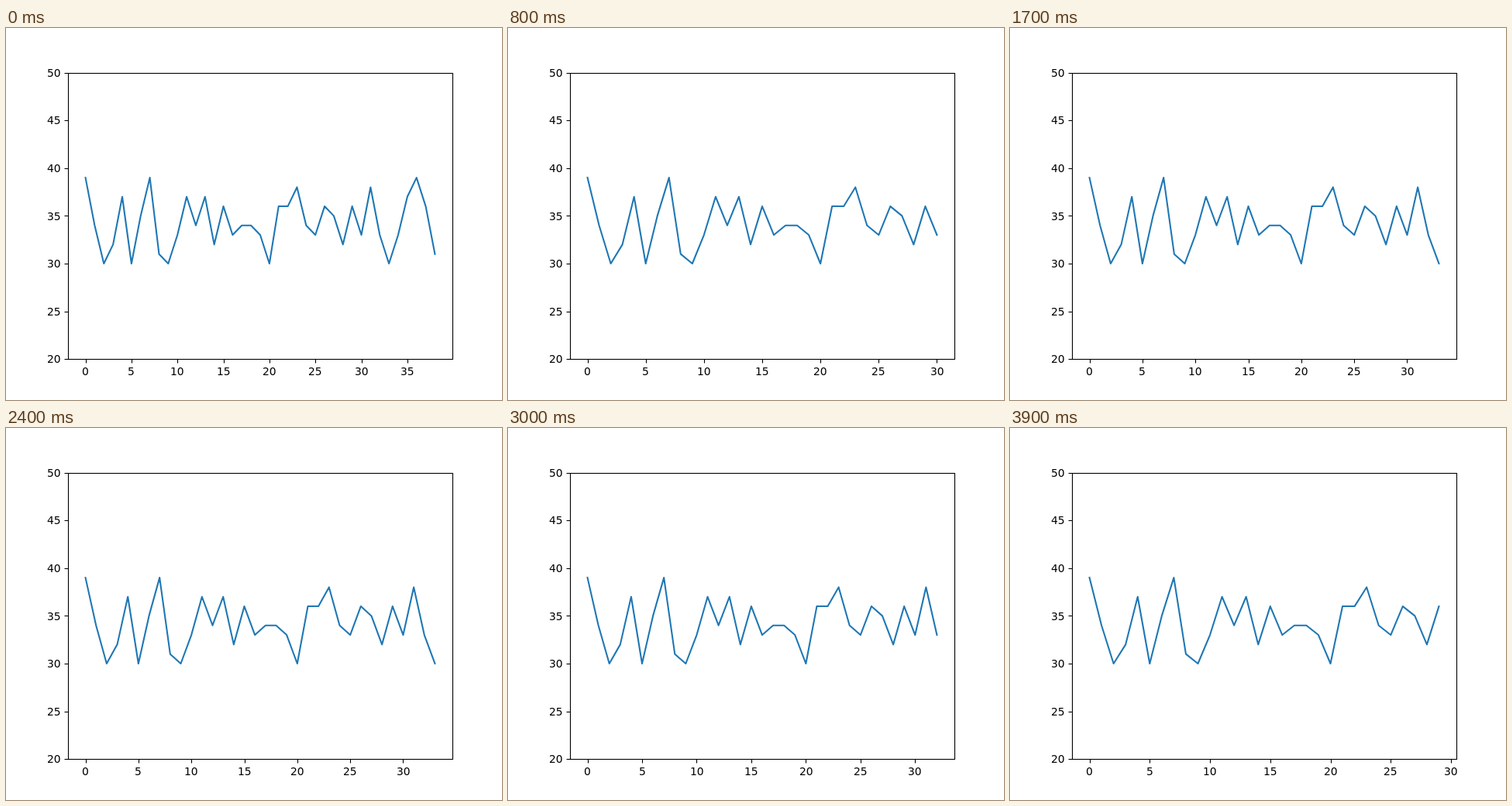
An HTML page with a canvas that plays this animation: 640 by 480 pixels, repeating every 4000 ms.

```html
<!DOCTYPE html>
<html lang="en">
<head>
<meta charset="utf-8">
<title>Line chart</title>
<style>
  html, body { margin: 0; width: 100%; height: 100%; overflow: hidden; background: #fff; }
  canvas { display: block; }
</style>
</head>
<body>
<canvas id="chart" width="640" height="480"></canvas>
<script>
const ctx = document.getElementById('chart').getContext('2d');

// Each step shows as many leading points as the value of that step.
const values = [
  39, 34, 30, 32, 37, 30, 35, 39, 31, 30, 33, 37, 34, 37, 32, 36, 33, 34, 34, 33,
  30, 36, 36, 38, 34, 33, 36, 35, 32, 36, 33, 38, 33, 30, 33, 37, 39, 36, 31, 30
];
const STEP_MS = 100;
const LEFT = 80, RIGHT = 576, TOP = 57.6, BOTTOM = 427.2;
const Y_MIN = 20, Y_MAX = 50, TICK = 5, MARGIN = 0.05;

const snap = v => Math.round(v) + 0.5;
const yPos = v => BOTTOM - (v - Y_MIN) / (Y_MAX - Y_MIN) * (BOTTOM - TOP);

function segment(x1, y1, x2, y2) {
  ctx.beginPath();
  ctx.moveTo(x1, y1);
  ctx.lineTo(x2, y2);
  ctx.stroke();
}

// align: 0.5 centres the text on x, 1 ends it there
function label(text, x, baseline, align) {
  const width = ctx.measureText(text).width;
  ctx.fillText(text, Math.round(x - width * align), Math.round(baseline));
}

function draw(count) {
  const last = count - 1;
  const xPos = i => LEFT + (RIGHT - LEFT) * (i / last + MARGIN) / (1 + 2 * MARGIN);

  ctx.fillStyle = '#fff';
  ctx.fillRect(0, 0, 640, 480);

  ctx.strokeStyle = '#1f77b4';
  ctx.lineWidth = 2.083;
  ctx.lineJoin = 'round';
  ctx.lineCap = 'square';
  ctx.beginPath();
  values.slice(0, count).forEach((v, i) => ctx.lineTo(xPos(i), yPos(v)));
  ctx.stroke();

  ctx.strokeStyle = ctx.fillStyle = '#000';
  ctx.lineWidth = 1.111;
  ctx.lineJoin = 'miter';
  ctx.lineCap = 'butt';
  ctx.font = '13.889px "DejaVu Sans", sans-serif';
  ctx.strokeRect(snap(LEFT), snap(TOP), RIGHT - LEFT, snap(BOTTOM) - snap(TOP));

  for (let i = 0; i <= last * (1 + MARGIN); i += TICK) {
    const x = snap(xPos(i)), y = snap(BOTTOM);
    segment(x, y, x, y + 5);
    label(i, xPos(i), 448, 0.5);
  }
  for (let v = Y_MIN; v <= Y_MAX; v += TICK) {
    const x = snap(LEFT), y = snap(yPos(v));
    segment(x, y, x - 5, y);
    label(v, 70.28, yPos(v) + 5.2, 1);
  }
}

function frame() {
  const step = Math.floor(performance.now() / STEP_MS) % values.length;
  draw(values[step]);
  requestAnimationFrame(frame);
}
frame();
</script>
</body>
</html>
```
